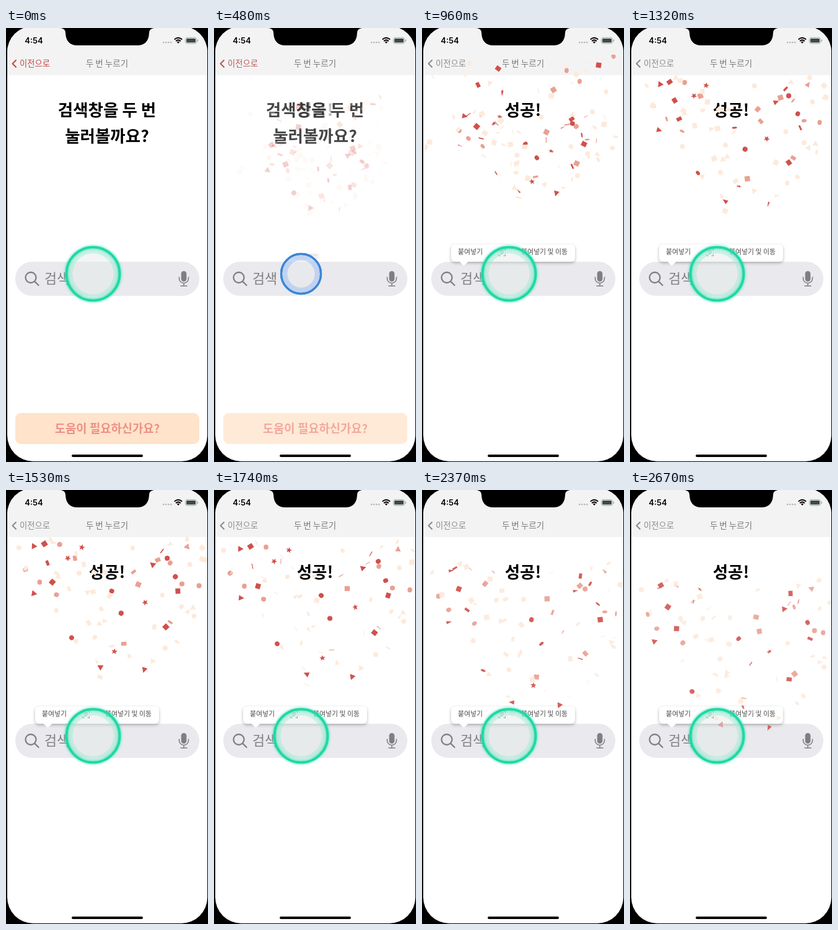
An HTML page with a canvas that plays this animation: 326 px wide and 700 px high, repeating every 2700 ms.

```html
<!DOCTYPE html>
<html lang="ko">
<head>
<meta charset="utf-8">
<style>
html, body { margin: 0; width: 100%; height: 100%; overflow: hidden; background: #000; }
canvas { display: block; width: 326px; height: 700px; }
</style>
</head>
<body>
<canvas id="stage" width="326" height="700"></canvas>
<script>
const ctx = document.getElementById('stage').getContext('2d');
const LOOP = 2700, TAU = Math.PI * 2;
const KOREAN = '"Noto Sans CJK KR", "Noto Sans CJK", sans-serif';
const RED = '#d0504c', CORAL = '#e9a092', PALE = '#fdeadb';

const mix = (a, b, p) => a + (b - a) * p;
const mixColor = (a, b, p, alpha = 1) =>
  `rgba(${a.map((v, i) => Math.round(mix(v, b[i], p)))},${alpha})`;

// Linear interpolation through [time, value] pairs
function track(keys, t) {
  const i = keys.findIndex(k => k[0] > t);
  if (i === 0) return keys[0][1];
  if (i < 0) return keys[keys.length - 1][1];
  const [t0, v0] = keys[i - 1], [t1, v1] = keys[i];
  return mix(v0, v1, (t - t0) / (t1 - t0));
}

const PRESS = [[30, 0], [120, 1], [180, 1], [270, 0], [360, 0], [450, 1], [480, 1], [600, 0]];
const SUCCESS = [[400, 0], [480, .27], [660, 1]];
const POP = [[450, 0], [480, .21], [600, 1]];
const SPREAD = [[380, .5], [480, .6], [960, .8], [1320, .94], [1740, 1], [2700, 1.02]];
const RISE = [[380, .38], [480, .45], [960, .6], [1150, .82], [1320, .95], [1740, 1]];
const FALL = [[380, 42], [480, 33], [960, 0], [1150, -8], [1320, -11], [1500, -9], [1740, 0], [2370, 38], [2700, 71]];

let seed = 11;
const random = () => (seed = seed * 16807 % 2147483647) / 2147483647;

// x, y and shape of the main pieces: c circle, s square, t triangle, x star, b sliver, h hexagon
const redPieces = [
  [42, 95, 't'], [59, 91, 's'], [62, 123, 'b'], [97, 115, 'x'], [121, 97, 'x'], [71, 155, 's'],
  [43, 174, 't'], [173, 170, 'c'], [228, 189, 'x'], [281, 170, 's'], [265, 115, 'c'], [253, 103, 'b'],
  [240, 126, 't'], [277, 146, 'c'], [187, 207, 'c'], [259, 230, 's'], [102, 248, 'h'], [175, 271, 'x'],
  [150, 297, 't'], [223, 301, 't']];
const coralPieces = [
  [26, 134, 'c'], [49, 155, 'c'], [80, 176, 'c'], [108, 115, 'b'], [215, 159, 's'], [266, 123, 'c'],
  [297, 96, 't'], [316, 161, 'c'], [288, 158, 'c'], [190, 258, 'b'], [266, 222, 'b'], [248, 118, 'b'],
  [84, 92, 'c'], [205, 138, 'b']];

const pieces = [];
function addPiece(x, y, shape, color) {
  const edgeOn = shape === 'b' ? 1.4 : color === PALE ? random() * 1.2 : .3;
  pieces.push({ x, y, shape, color, angle: random() * TAU, spin: mix(-2, 2, random()),
    flip: edgeOn + random() * .2, tumble: mix(1, 4, random()), sway: random() * TAU });
}
const anyShape = () => 'csctb'[Math.floor(random() * 5)];
redPieces.forEach(p => addPiece(...p, RED));
coralPieces.forEach(p => addPiece(...p, CORAL));
for (let i = 0; i < 46; i++) {
  const side = mix(-1, 1, random());
  addPiece(163 + side * 195, 82 + 245 * random() ** 1.3 * (1 - side * side * .6), anyShape(), PALE);
}
for (let i = 0; i < 24; i++) {
  addPiece(mix(-35, 361, random()), mix(-70, 65, random()), anyShape(),
    [RED, PALE, CORAL, PALE, PALE, PALE][i % 6]);
}

function text(str, x, middle, size, color, weight = 400, align = 'left', family = KOREAN) {
  ctx.font = `${weight} ${size}px ${family}`;
  ctx.fillStyle = color;
  ctx.textAlign = align;
  ctx.fillText(str, x, middle + size * .37);
}

function box(x, y, w, h, r, color) {
  ctx.fillStyle = color;
  ctx.beginPath();
  ctx.roundRect(x, y, w, h, r);
  ctx.fill();
}

function stroke(path, color, width) {
  ctx.strokeStyle = color;
  ctx.lineWidth = width;
  ctx.lineCap = ctx.lineJoin = 'round';
  ctx.stroke(new Path2D(path));
}

function polygon(n, r, inner = r) {
  ctx.beginPath();
  for (let i = 0; i < n; i++) {
    const a = i * TAU / n, d = i % 2 ? inner : r;
    ctx.lineTo(d * Math.cos(a), d * Math.sin(a));
  }
  ctx.fill();
}

function drawStatusBar() {
  ctx.fillStyle = '#000';
  ctx.fill(new Path2D('M88 0Q96 1 96 8Q97 28 115 28H212Q230 28 231 8Q231 1 239 0Z'));
  text('4:54', 45, 20.3, 13, '#000', 600, 'center', 'Inter, sans-serif');
  for (let i = 0; i < 4; i++) box(253 + i * 4, 22, 2.5, 2.5, 1.2, '#b5b5b7');
  stroke('M272.5 18Q278 13.5 283.5 18M274.7 20.7Q278 18 281.3 20.7', '#000', 2);
  ctx.fillStyle = '#000';
  ctx.fill(new Path2D('M275.7 22.5Q278 20.8 280.3 22.5L278 25Z'));
  ctx.strokeStyle = '#a3a3a5';
  ctx.lineWidth = 1;
  ctx.beginPath();
  ctx.roundRect(289.5, 15.5, 18, 9.5, 3);
  ctx.stroke();
  box(291, 17, 15, 6.5, 1.5, '#3c4a40');
  box(308.7, 18.5, 1.3, 3.5, .6, '#a3a3a5');
}

function drawSearch() {
  const grey = '#7f7f83';
  box(15, 377, 297, 55, 27, '#e9e9ee');
  stroke('M48.5 402.5A8.5 8.5 0 1 1 31.5 402.5A8.5 8.5 0 1 1 48.5 402.5M46.5 409L52.5 415', grey, 2.3);
  text('검색', 62, 403.5, 21.7, grey);
  box(282.7, 392, 8.6, 17, 4.3, grey);
  stroke('M279.5 402V404A7.5 7.5 0 0 0 294.5 404V402M287 411.5V416M282 416H292', grey, 1.6);
}

function drawPopover(scale) {
  if (!scale) return;
  ctx.save();
  ctx.translate(148, 367);
  ctx.scale(scale, scale);
  ctx.translate(-148, -367);
  ctx.globalAlpha = Math.min(1, .3 + scale * .7);
  ctx.shadowColor = 'rgba(0,0,0,.28)';
  ctx.shadowBlur = 5;
  ctx.shadowOffsetY = 2;
  box(47, 349, 200, 28, 6, '#fff');
  ctx.shadowColor = 'transparent';
  ctx.fill(new Path2D('M60 376.5L67.5 383.5L75 376.5Z'));
  text('붙여넣기', 58, 361, 10.9, '#4a4a4a');
  text('붙여넣기 및 이동', 160, 361, 10.9, '#4a4a4a');
  stroke('M123.5 359V356.5H126M132 356.5H134.5V359M134.5 365V367.5H132M126 367.5H123.5V365' +
    'M126.5 359.5H131.5M126.5 362H131.5M126.5 364.5H130', '#4a4a4a', 1);
  ctx.restore();
}

function drawConfetti(t, alpha) {
  const spread = track(SPREAD, t), rise = track(RISE, t), fall = track(FALL, t);
  const s = (t - 1740) / 1000;
  const fade = track([[1740, 1], [2670, .87]], t);
  const topFade = track([[1050, 1], [1450, 0]], t);
  ctx.save();
  ctx.beginPath();
  ctx.rect(2, 43, 324, 640);
  ctx.clip();
  for (const p of pieces) {
    const sway = 4 * (Math.sin(s * 2.5 + p.sway) - Math.sin(p.sway));
    ctx.save();
    ctx.globalAlpha = alpha * fade * (p.y < 70 ? topFade : 1);
    ctx.translate(163 + (p.x - 163) * spread + sway,
      213 + (p.y - 213) * rise + fall * (.8 + p.y / 750));
    ctx.rotate(p.angle + p.spin * s);
    const flip = Math.cos(p.flip + p.tumble * s);
    ctx.scale(1, Math.sign(flip || 1) * Math.max(.14, Math.abs(flip)));
    ctx.fillStyle = p.color;
    if (p.shape === 'c') {
      ctx.beginPath();
      ctx.arc(0, 0, 4.1, 0, TAU);
      ctx.fill();
    } else if (p.shape === 't') polygon(3, 5.8);
    else if (p.shape === 'x') polygon(10, 5.2, 2.2);
    else if (p.shape === 'h') polygon(6, 4.4);
    else ctx.fillRect(-4.2, -4.2, 8.4, 8.4);
    ctx.restore();
  }
  ctx.restore();
}

function drawTouch(q) {
  const x = 140.5, y = 396.5, r = mix(43, 32, q), inner = mix(33, 22, q);
  ctx.fillStyle = mixColor([186, 235, 220], [180, 203, 242], q, .75);
  ctx.beginPath();
  ctx.arc(x, y, r, 0, TAU);
  ctx.arc(x, y, inner, 0, TAU);
  ctx.fill('evenodd');
  ctx.fillStyle = mixColor([230, 235, 233], [230, 233, 236], q, .5);
  ctx.beginPath();
  ctx.arc(x, y, inner, 0, TAU);
  ctx.fill();
  const color = mixColor([27, 217, 164], [58, 133, 214], q);
  ctx.save();
  ctx.shadowColor = color;
  ctx.shadowBlur = mix(4, 0, q);
  ctx.strokeStyle = color;
  ctx.lineWidth = mix(3.6, 3.2, q);
  ctx.beginPath();
  ctx.arc(x, y, r, 0, TAU);
  ctx.stroke();
  ctx.restore();
}

function draw(t) {
  const done = track(SUCCESS, t);
  ctx.fillStyle = '#000';
  ctx.fillRect(0, 0, 326, 700);
  ctx.save();
  ctx.beginPath();
  ctx.roundRect(2, -3, 323, 702, 42);
  ctx.clip();
  ctx.fillStyle = '#fff';
  ctx.fillRect(0, 0, 326, 700);
  ctx.fillStyle = '#f3f3f4';
  ctx.fillRect(0, 0, 326, 76);
  drawStatusBar();

  const back = mixColor([200, 68, 61], [138, 138, 138], done);
  stroke('M16 52L10.5 57.5L16 63', back, 2);
  text('이전으로', 22, 57, 13.3, back);
  text('두 번 누르기', 163, 57, 13.5, '#777', 400, 'center');

  ctx.globalAlpha = 1 - done;
  text('검색창을 두 번', 163, 132, 26.5, '#000', 700, 'center');
  text('눌러볼까요?', 163, 174, 26.5, '#000', 700, 'center');
  box(15, 621, 297, 50, 9, '#ffe3ca');
  text('도움이 필요하신가요?', 163.5, 646, 18.8, '#ee9087', 700, 'center');
  ctx.globalAlpha = done;
  text('성공!', 163, 132, 26.5, '#000', 700, 'center');
  ctx.globalAlpha = 1;

  drawSearch();
  drawPopover(track(POP, t));
  if (done) drawConfetti(t, done);
  drawTouch(track(PRESS, t));
  box(106, 688, 115, 4, 2, '#000');
  ctx.restore();
}

const start = performance.now();
function frame() {
  draw((performance.now() - start) % LOOP);
  requestAnimationFrame(frame);
}
frame();
</script>
</body>
</html>
```
